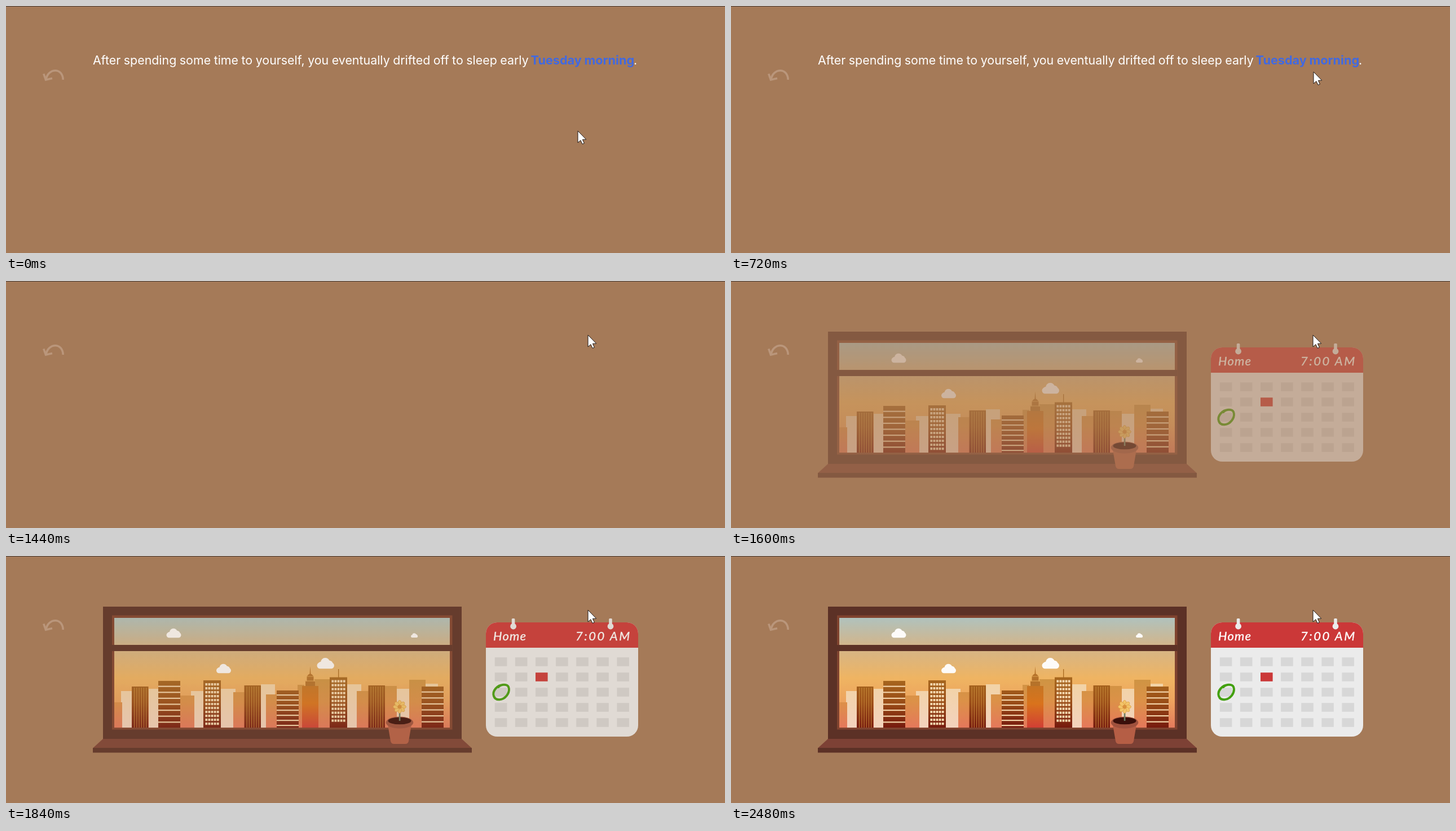
An HTML page for the animation above (2.56 s loop, 1275 px wide and 439 px high).

```html
<!DOCTYPE html>
<html lang="en">
<head>
<meta charset="utf-8">
<title>Tuesday morning</title>
<style>
  html, body { margin: 0; width: 100%; height: 100%; overflow: hidden; background: #a57a58; }
  svg { display: block; width: 1275px; height: 439px; }
  #story { font: 21.4px Inter, "Open Sans", sans-serif; word-spacing: -.5px; fill: #fff; }
  #link { font-size: 21.7px; font-weight: 700; }
  .hand { font: italic 22px Lato, "Open Sans", sans-serif; fill: #fff; stroke: #fff; stroke-width: .4; }
</style>
</head>
<body>
<svg viewBox="0 0 1275 439" xmlns="http://www.w3.org/2000/svg">
  <defs>
    <linearGradient id="sky" gradientUnits="userSpaceOnUse" x1="0" y1="110" x2="0" y2="305">
      <stop offset="0" stop-color="#b0c2bd"/>
      <stop offset=".25" stop-color="#d2b58b"/>
      <stop offset=".55" stop-color="#efb462"/>
      <stop offset=".75" stop-color="#eda45e"/>
      <stop offset="1" stop-color="#e57b5c"/>
    </linearGradient>
    <linearGradient id="tan" gradientUnits="userSpaceOnUse" x1="0" y1="220" x2="0" y2="305">
      <stop offset="0" stop-color="#cf9443"/>
      <stop offset=".45" stop-color="#dc9148"/>
      <stop offset="1" stop-color="#e5785b"/>
    </linearGradient>
    <linearGradient id="cream" gradientUnits="userSpaceOnUse" x1="0" y1="228" x2="0" y2="305">
      <stop offset="0" stop-color="#f2d3a6"/>
      <stop offset="1" stop-color="#f3d2bd"/>
    </linearGradient>
    <linearGradient id="front" gradientUnits="userSpaceOnUse" x1="0" y1="215" x2="0" y2="305">
      <stop offset="0" stop-color="#a8691f"/>
      <stop offset=".5" stop-color="#9a4d17"/>
      <stop offset="1" stop-color="#761a0e"/>
    </linearGradient>
    <linearGradient id="tower" gradientUnits="userSpaceOnUse" x1="0" y1="210" x2="0" y2="305">
      <stop offset="0" stop-color="#b9772a"/>
      <stop offset=".55" stop-color="#d9731c"/>
      <stop offset="1" stop-color="#d13f34"/>
    </linearGradient>
    <clipPath id="page"><rect x="851" y="118" width="270" height="203" rx="20"/></clipPath>
  </defs>

  <rect width="1275" height="439" fill="#a57a58"/>
  <rect width="1275" height="1" fill="#453a33"/>
  <path d="M101.2 131C100.5 109 75 110 71 130M66.8 120.5L70.5 131.2 82 128.6" fill="none" stroke="#ba967b" stroke-width="3.6"/>

  <g id="story">
    <text x="154" y="103.5">After spending some time to yourself, you eventually drifted off to sleep early</text>
    <text id="link" x="930.5" y="103.5">Tuesday morning</text>
    <text x="1113" y="103.5">.</text>
  </g>

  <g id="scene" opacity="0">
    <g id="window"></g>
    <g id="calendar"></g>
  </g>

  <g id="cursor" fill="#fff" stroke="#1c1512" stroke-linejoin="round">
    <path id="arrow" d="M0 0V21L4.9 16.7 8 23.4 11.4 22 8.4 15.4 14.7 15.1Z"/>
    <path id="pointer" d="M-2 1.5Q0-1 2 1.5V9q2-1.5 4 .8q2.5-1 4 1q3.5-.8 3.8 2.5V18l-2.5 8H-3.5L-9 15.5q0-3 3-2l4 3.5Z"/>
  </g>
</svg>

<script>
const $ = id => document.getElementById(id);
const GROUND = 305;
const times = (n, fn) => Array.from({ length: n }, (_, i) => fn(i)).join("");
const rect = (x, y, w, h, fill, extra = "") =>
  `<rect x="${x}" y="${y}" width="${w}" height="${h}" fill="${fill}" ${extra}/>`;
const ellipse = (x, y, rx, ry, fill, extra = "") =>
  `<ellipse cx="${x}" cy="${y}" rx="${rx}" ry="${ry}" fill="${fill}" ${extra}/>`;
const path = (d, fill, extra = "") => `<path d="${d}" fill="${fill}" ${extra}/>`;
const block = (x1, x2, top, fill) => rect(x1, top, x2 - x1, GROUND - top, `url(#${fill})`);

const striped = (x, top) => block(x, x + 29.5, top, "front") +
  times(6, i => rect(x + 4 + i * 4.2, top + 2, 1.3, GROUND - top - 2, "#d59a45", 'opacity=".65"'));

const banded = (x, top, step) => block(x, x + 39, top, "front") +
  times(Math.floor((GROUND - top - 3) / step), i => rect(x, top + step * (i + 1) - 2, 39, 2.2, "#f3d3a8"));

const gridded = (x, top) => block(x, x + 31, top, "front") +
  times(Math.floor((GROUND - top - 6) / 7), r =>
    times(5, c => rect(x + 3.4 + c * 5.1, top + 5 + r * 7, 3.8, 4.2, "#f5d9b0")));

const cloud = (x, y, s) => `<g transform="translate(${x} ${y}) scale(${s})">` +
  rect(0, 7, 26, 9.5, "#fdfbf9", 'rx="4.75"') + ellipse(12.5, 7, 7, 7, "#fdfbf9") +
  ellipse(18.5, 9, 5.5, 5, "#fdfbf9") + ellipse(6, 10, 4.5, 4, "#fdfbf9") + "</g>";

function skyline() {
  const cream = [[204, 223, 240], [253, 270, 236], [328, 350, 240], [381, 407, 236],
    [452, 477, 228], [604, 630, 228], [690, 715, 236], [744, 766, 227]];
  const tan = [[192, 206, 260], [309, 334, 248], [403, 423, 242], [461, 481, 246],
    [517, 529, 229], [547, 577, 219], [622, 643, 240], [671, 693, 231], [715, 744, 220]];
  return cream.map(b => block(...b, "cream")).join("") +
    tan.map(b => block(...b, "tan")).join("") +
    striped(223, 232) + banded(270, 222, 10.6) + gridded(350, 221) +
    striped(422.5, 230) + banded(480, 239, 9) +
    block(525, 554, 231, "tower") +
    path("M531 231V223H533.5V215Q535 210.5 538.5 209.5L539.5 196 540.5 209.5Q544 210.5 545.5 215V223H548V231Z", "#b5722a") +
    rect(530, 221.5, 19, 1.2, "#dda04f") + rect(533, 213.5, 13, 1, "#dda04f") +
    rect(589, 201, 1.3, 15, "#a8691f") + gridded(574, 215.5) +
    striped(642.5, 230) + banded(737, 232, 10.6);
}

function plant() {
  const petal = i => ellipse(698, 261.5, 3.2, 5, "#f3c468",
    `stroke="#d99a3f" stroke-width=".7" transform="rotate(${i * 45} 698 268)"`);
  return path("M677 300L682 329Q683 334 688 334H708Q713 334 714 329L719 300Z", "#b55e45") +
    ellipse(698, 296, 24.3, 10.5, "#9f513d") + ellipse(698, 293, 20.5, 6.3, "#3a0f0a") +
    rect(696.8, 276, 2.6, 17, "#6c7d64") + times(8, petal) + ellipse(698, 268, 3.6, 3.6, "#d98f3c");
}

const DARK = "#5c3126", TRIM = "#80432f";
$("window").innerHTML =
  rect(172, 90, 636, 235.5, DARK) + rect(188, 105.5, 603.5, 203, TRIM) +
  rect(192, 110, 595, 195, "url(#sky)") + skyline() +
  cloud(284.5, 128.8, 1) + cloud(373, 191.8, 1) + cloud(551.5, 181, 1.17) + cloud(718, 137.2, .47) +
  rect(188, 158, 603.5, 11, DARK) +
  path("M172 325H808L826 341.5H154Z", "#7d4135") + rect(154, 341, 672, 8.5, DARK) + plant();

const pin = x => rect(x - 2.8, 111, 5.6, 15, "#ebebeb", 'rx="1.5"') + ellipse(x, 125, 5.4, 5.4, "#ebebeb");
$("calendar").innerHTML =
  `<g clip-path="url(#page)">${rect(851, 118, 270, 203, "#ebebeb")}${rect(851, 118, 270, 45, "#cb3838")}</g>` +
  pin(899.6) + pin(1072) +
  times(5, r => times(7, c =>
    rect(866.8 + c * 36.1, 180.2 + r * 27, 21.6, 15.6, r === 1 && c === 2 ? "#cb3838" : "#d7d7d7"))) +
  path("M882 229C871 229 862 240 865 249C868 258 881 257 888 248C894 240 893 230 886 229C881 228 876 230 873 233",
    "none", 'stroke="#43a00f" stroke-width="4" stroke-linecap="round"') +
  '<text class="hand" x="864" y="150" letter-spacing="1.2">Home</text>' +
  '<text class="hand" x="1010" y="150" letter-spacing="2.5">7:00 AM</text>';

// Every table below holds one value per tick.
const TICK = 80, LOOP = 2560;
const track = [[1014, 222], [1016, 218], [1019, 210], [1022, 199], [1025, 188], [1028, 177], [1030, 163],
  [1032, 148], [1033, 131], [1033, 117], [1033, 106], [1032, 100], [1032, 97], [1032, 96]];
const fadeOut = [.8, .5, .2, 0];
const fadeIn = [.45, .58, .72, .85, .93, .98, 1];
const hover = [0, .2, .6, 1];
const at = (table, i) => table[Math.max(0, Math.min(table.length - 1, i))];
const mix = (a, b, k) => a.map((v, i) => Math.round(v + (b[i] - v) * k));

function draw(ms) {
  const n = Math.floor((ms % LOOP) / TICK);
  $("story").setAttribute("opacity", n < 15 ? 1 : at(fadeOut, n - 15));
  $("scene").setAttribute("opacity", n < 20 ? 0 : at(fadeIn, n - 20));
  $("link").style.fill = `rgb(${mix([65, 105, 225], [0, 191, 255], at(hover, n - 9))})`;
  $("cursor").setAttribute("transform", `translate(${at(track, n)})`);
  const over = n >= 10 && n < 16;
  $("arrow").setAttribute("visibility", over ? "hidden" : "visible");
  $("pointer").setAttribute("visibility", over ? "visible" : "hidden");
}

const start = performance.now();
function loop() {
  draw(performance.now() - start);
  requestAnimationFrame(loop);
}
loop();
</script>
</body>
</html>
```
